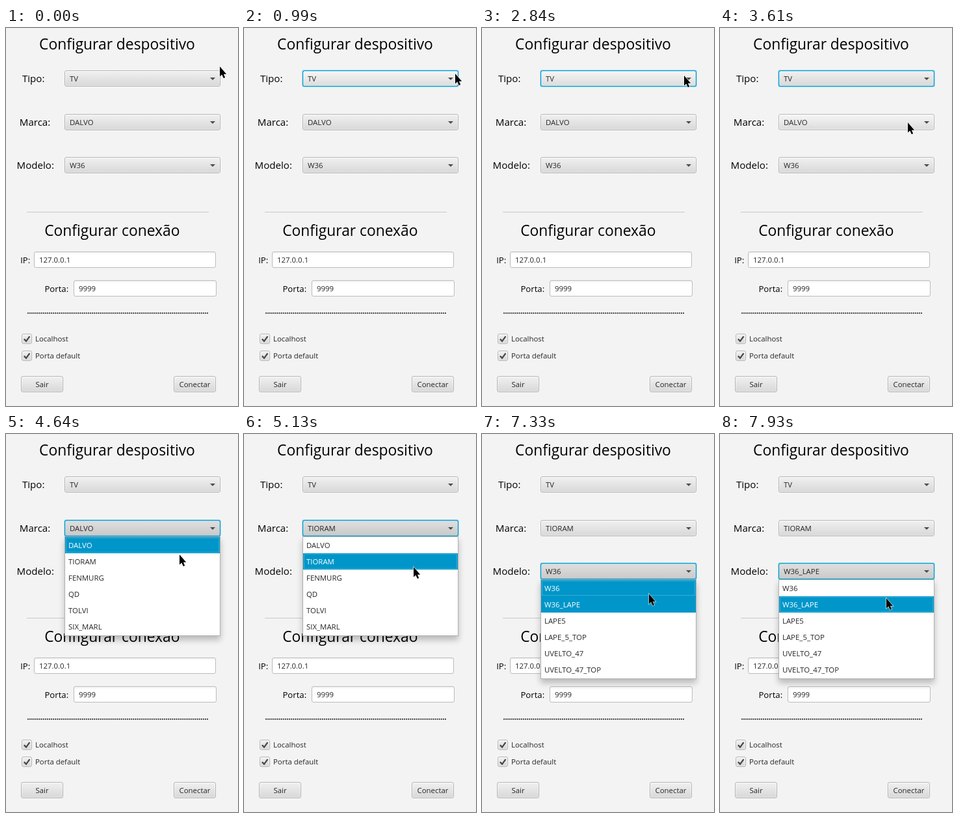
Write an HTML page that moves like this. It is 357 by 580 pixels and loops after 8000 ms.

```html
<!DOCTYPE html>
<html lang="pt">
<head>
<meta charset="utf-8">
<title>Configurar</title>
<style>
html, body { margin: 0; width: 100%; height: 100%; overflow: hidden; background: #f3f3f3; }
body { position: relative; font: 11.4px/25px "Open Sans", "Noto Sans", sans-serif; color: #262626; white-space: nowrap; }
svg { position: absolute; left: 0; top: 0; overflow: visible; }
.title { font-size: 22.8px; }
.label { font-size: 15.1px; }
.small { font-size: 13.2px; }
.note { fill: #262626; }

.face {
  position: absolute; box-sizing: border-box; padding: 1px;
  border: 1px solid #b5b5b5; border-radius: 3px;
  background: linear-gradient(#efefef, #d9d9d9) content-box, linear-gradient(#fcfcfc, #e4e4e4) padding-box;
  box-shadow: 0 1px 0 #f8f8f8;
}
.btn { top: 534px; width: 65px; height: 25px; line-height: 21px; text-align: center; }
.check { left: 24px; width: 16px; height: 16px; }
.field {
  position: absolute; box-sizing: border-box; height: 25px; padding-left: 7px; line-height: 23px;
  border: 1px solid #bcbcbc; border-radius: 3px;
  background: linear-gradient(#f3f3f3, #fff 4px);
}

.combo { position: absolute; left: 90px; width: 240px; height: 25px; }
.combo > * { position: absolute; }
.combo > .face, .ring { inset: 0; }
.combo > span { left: 8px; top: 0; }
.combo > b { left: 224px; top: 11px; border: 4px solid transparent; border-top-color: #4c4c4c; border-bottom: 0; }
.ring {
  border-radius: 3px;
  box-shadow: 0 0 0 1px #039ed34d, inset 0 0 0 1px #039ed3, inset 0 0 0 2px #039ed333;
}
.list {
  z-index: 2; left: 0; top: 25px; width: 238px; padding-bottom: 1px;
  border: 1px solid #b0b0b0; background: #fff; box-shadow: 0 6px 9px rgba(0, 0, 0, .24);
}
.list div { height: 25px; padding-left: 5px; }
.list .sel { background: #0096c9; color: #fff; box-shadow: inset 0 0 0 1px #0096c9, inset 0 0 0 2px #35acd5; }
#cursor { z-index: 3; }

.a { animation: 8s step-end infinite; }
#cursor { animation-name: move; }
#tipo .face { animation-name: tipo-face; }
#tipo .ring { animation-name: tipo-ring; }
#tipo .list { animation-name: tipo-list; }
#marca .face { animation-name: marca-face; }
#marca .ring { animation-name: marca-ring; }
#marca .list { animation-name: marca-list; }
#marca .old { animation-name: marca-old; }
#marca .new { animation-name: marca-new; }
#marca .sel { animation-name: marca-drop; }
#marca .pick { animation-name: marca-pick; }
#modelo .face { animation-name: modelo-face; }
#modelo .ring, #modelo .list { animation-name: modelo-open; }
#modelo .old { animation-name: modelo-old; }
#modelo .new { animation-name: modelo-new; }
#modelo .sel { animation-name: modelo-drop; }
#modelo .pick { animation-name: modelo-pick; }

@keyframes tipo-face {
  0%, 40%, 100% { filter: none; }
  7.625%, 35.5% { filter: brightness(1.02); }
  17.625% { filter: brightness(.93); }
}
@keyframes tipo-ring { 0%, 52.25%, 100% { opacity: 0; } 12.375% { opacity: 1; } }
@keyframes tipo-list { 0%, 35.5%, 100% { opacity: 0; } 17.625% { opacity: 1; } }

@keyframes marca-face {
  0%, 65.625%, 100% { filter: none; }
  44.4% { filter: brightness(1.02); }
  53.5% { filter: brightness(.93); }
}
@keyframes marca-ring { 0%, 78.375%, 100% { opacity: 0; } 52.25% { opacity: 1; } }
@keyframes marca-list { 0%, 65.625%, 100% { opacity: 0; } 53.5% { opacity: 1; } }
@keyframes marca-old { 0% { opacity: 1; } 64.125%, 100% { opacity: 0; } }
@keyframes marca-new { 0% { opacity: 0; } 64.125%, 100% { opacity: 1; } }
@keyframes marca-drop { 64.125%, 100% { background: #fff; color: #262626; box-shadow: none; } }
@keyframes marca-pick {
  58.75% { background: #0096c9; color: #fff; box-shadow: none; }
  64.125%, 100% { background: #0096c9; color: #fff; box-shadow: inset 0 0 0 1px #0096c9, inset 0 0 0 2px #35acd5; }
}

@keyframes modelo-face {
  0% { filter: none; }
  65.625% { filter: brightness(1.02); }
  78.375%, 100% { filter: brightness(.93); }
}
@keyframes modelo-open { 0% { opacity: 0; } 78.375%, 100% { opacity: 1; } }
@keyframes modelo-old { 0% { opacity: 1; } 99.125%, 100% { opacity: 0; } }
@keyframes modelo-new { 0% { opacity: 0; } 99.125%, 100% { opacity: 1; } }
@keyframes modelo-drop { 99.125%, 100% { background: #fff; color: #262626; box-shadow: none; } }
@keyframes modelo-pick {
  91.625% { background: #0096c9; color: #fff; box-shadow: none; }
  99.125%, 100% { background: #0096c9; color: #fff; box-shadow: inset 0 0 0 1px #0096c9, inset 0 0 0 2px #35acd5; }
}

@keyframes move {
  0% { transform: translate(329px, 60px); }
  .75% { transform: translate(329px, 61px); }
  4.625% { transform: translate(329px, 61px); animation-timing-function: steps(4, jump-both); }
  7.625% { transform: translate(325px, 71px); }
  19.5% { transform: translate(325px, 71px); animation-timing-function: steps(4, jump-both); }
  22.5% { transform: translate(311px, 74px); }
  39.125% { transform: translate(311px, 74px); animation-timing-function: steps(8, jump-both); }
  45.125% { transform: translate(289px, 146px); }
  54.25% { transform: translate(289px, 146px); animation-timing-function: steps(6, jump-both); }
  58% { transform: translate(267px, 186px); }
  58.75% { transform: translate(267px, 186px); animation-timing-function: steps(2, jump-both); }
  60.25% { transform: translate(261px, 205px); }
  68.625% { transform: translate(261px, 205px); animation-timing-function: steps(3, jump-both); }
  70.375% { transform: translate(262px, 209px); }
  81.625% { transform: translate(262px, 209px); animation-timing-function: steps(11, jump-both); }
  89.375% { transform: translate(257px, 245px); }
  91.625% { transform: translate(257px, 245px); animation-timing-function: steps(5, jump-both); }
  96.125%, 100% { transform: translate(256px, 253px); }
}
</style>
</head>
<body>
<svg width="357" height="580">
  <text class="title" x="51" y="33">Configurar despositivo</text>
  <text class="label" x="24.9" y="83">Tipo:</text>
  <text class="label" x="20.8" y="150">Marca:</text>
  <text class="label" x="16.6" y="216">Modelo:</text>
  <path d="M32 282.5H312" stroke="#c9c9c9"/>
  <text class="title" x="59.2" y="319">Configurar conexão</text>
  <text class="small" x="22.2" y="361">IP:</text>
  <text class="small" x="59.4" y="405">Porta:</text>
  <path d="M33 437.5H311" stroke="#111" stroke-width="1.6" stroke-dasharray="2 1"/>
  <text class="note" x="45" y="481">Localhost</text>
  <text class="note" x="45" y="507">Porta default</text>
</svg>

<div class="field" style="left:43px;top:343px;width:280px">127.0.0.1</div>
<div class="field" style="left:104px;top:387px;width:220px">9999</div>
<div class="face check" style="top:469px"></div>
<div class="face check" style="top:495px"></div>
<svg width="357" height="580" fill="none" stroke="#454545" stroke-width="2.2">
  <path d="M27.8 477.2L31 480.6L36.4 473.2M27.8 503.2L31 506.6L36.4 499.2"/>
</svg>
<div class="face btn" style="left:23px">Sair</div>
<div class="face btn" style="left:258px">Conectar</div>

<div class="combo" id="tipo" style="top:65px">
  <i class="face a"></i><i class="ring a"></i><span>TV</span><b></b>
  <div class="list a">
    <div class="sel">TV</div><div>TELEFONE</div><div>GELADEIRA</div>
  </div>
</div>
<div class="combo" id="marca" style="top:132px">
  <i class="face a"></i><i class="ring a"></i>
  <span class="old a">DALVO</span><span class="new a">TIORAM</span><b></b>
  <div class="list a">
    <div class="sel a">DALVO</div><div class="pick a">TIORAM</div><div>FENMURG</div>
    <div>QD</div><div>TOLVI</div><div>SIX_MARL</div>
  </div>
</div>
<div class="combo" id="modelo" style="top:198px">
  <i class="face a"></i><i class="ring a"></i>
  <span class="old a">W36</span><span class="new a">W36_LAPE</span><b></b>
  <div class="list a">
    <div class="sel a">W36</div><div class="pick a">W36_LAPE</div><div>LAPE5</div>
    <div>LAPE_5_TOP</div><div>UVELTO_47</div><div>UVELTO_47_TOP</div>
  </div>
</div>

<svg id="cursor" class="a" width="12" height="19">
  <path d="M0 -1V14.5L3.3 11.6L5.8 17L8.2 16L5.9 10.8H10.2Z" stroke="#fff" stroke-width="1.2" paint-order="stroke"/>
</svg>
</body>
</html>
```
